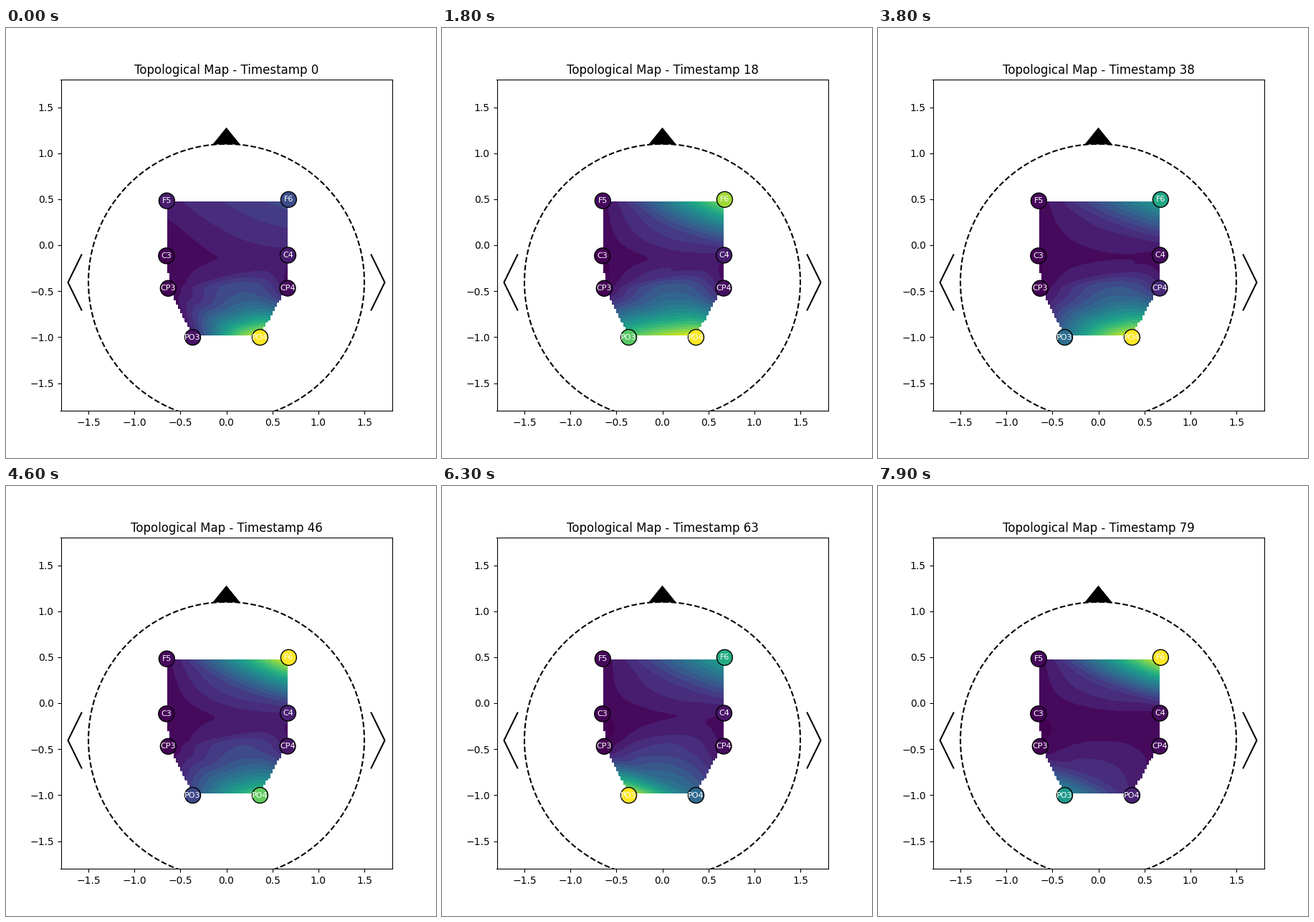
A matplotlib script for the animation above (8 s loop, 600x600 px).

```python
import numpy as np
import matplotlib.pyplot as plt
from matplotlib.animation import FuncAnimation
from matplotlib.tri import CubicTriInterpolator, Triangulation

FRAMES = 80
INTERVAL = 100
CYCLE = 26.5  # timestamps between two frontal peaks

SITES = {
    "F5": (-0.648, 0.482), "F6": (0.677, 0.4965),
    "C3": (-0.6525, -0.116), "C4": (0.670, -0.109),
    "CP3": (-0.6325, -0.470), "CP4": (0.666, -0.468),
    "PO3": (-0.366, -1.002), "PO4": (0.366, -1.002),
}
POS = np.array(list(SITES.values()))


def bump(t, centre, width):
    return np.exp(-((t - centre) / width) ** 2)


def activity(t):
    """Electrode values at time t, scaled to 0..1.

    Activity swings between the right frontal and right occipital sites,
    with two slower bursts on the left occipital one.
    """
    swing = np.sin(np.pi * t / CYCLE) ** 2
    onset = bump(t, 0, 10.4)
    fade = 1 / (1 + np.exp((t - 60) / 4))
    level = {
        "F5": 0.03 + 0.06 * bump(t, 0, 4),
        "F6": 1 - 0.45 * swing - 0.76 * onset,
        "C3": 0.01,
        "C4": 0.04 + 0.13 * bump(t, 8, 8) + 0.22 * bump(t, 54, 6),
        "CP3": 0.01,
        "CP4": 0.04 + 0.08 * bump(t, 38, 6),
        "PO3": 0.67 * bump(t, 25, 16) + 1.17 * bump(t, 68, 12.5),
        "PO4": 0.1 + 0.9 * max(onset, swing * fade),
    }
    vals = np.array([level[name] for name in SITES])
    return (vals - vals.min()) / np.ptp(vals)


def gradient_map(tri, pts):
    """Matrix from node values to nodal gradients of least edge curvature."""
    n = len(pts)
    lhs, rhs = np.zeros((2 * n, 2 * n)), np.zeros((2 * n, n))
    for a, b in tri.edges:
        for i, j in ((a, b), (b, a)):
            e = pts[j] - pts[i]
            w = 1 / np.hypot(*e) ** 3
            ri, rj = slice(2 * i, 2 * i + 2), slice(2 * j, 2 * j + 2)
            lhs[ri, ri] += 4 * w * np.outer(e, e)
            lhs[ri, rj] += 2 * w * np.outer(e, e)
            rhs[ri, j] += 6 * w * e
            rhs[ri, i] -= 6 * w * e
    return np.linalg.solve(lhs, rhs)


def basis_fields(pts, gx, gy):
    """Interpolated surface for a unit value at each electrode."""
    tri = Triangulation(*pts.T)
    grads = gradient_map(tri, pts)
    fields = []
    for i, unit in enumerate(np.eye(len(pts))):
        dz = (grads[0::2, i], grads[1::2, i])
        fields.append(CubicTriInterpolator(tri, unit, kind="user", dz=dz)(gx, gy))
    return np.ma.array(fields)


axis = np.linspace(-1.199, 1.199, 100)
GX, GY = np.meshgrid(axis, axis)
BASIS = basis_fields(POS, GX, GY)
MASK = np.ma.getmaskarray(BASIS).any(axis=0)
BASIS = BASIS.filled(0)

fig, ax = plt.subplots(figsize=(6, 6), dpi=100)
ax.set_xlim(-1.8, 1.8)
ax.set_ylim(-1.8, 1.8)
ax.set_aspect("equal")
title = ax.set_title("")

# Head, nose and ears
ax.add_patch(plt.Circle((0, -0.4), 1.5, fill=False, ls="--", lw=1.5))
ax.fill([-0.15, 0, 0.15], [1.095, 1.28, 1.095], "k", zorder=2)
for side in (-1, 1):
    ax.plot([side * 1.575, side * 1.722, side * 1.575], [-0.105, -0.405, -0.705],
            "k", lw=1.5)

dots = ax.scatter(*POS.T, c=np.zeros(len(POS)), s=250, cmap="viridis",
                  vmin=0, vmax=1, edgecolors="black", linewidths=1, zorder=3)
for name, (x, y) in SITES.items():
    ax.text(x, y, name, color="white", fontsize=8, ha="center", va="center",
            zorder=4)

surface = []


def update(t):
    while surface:
        surface.pop().remove()
    vals = activity(t)
    field = np.ma.array(np.tensordot(vals, BASIS, axes=1), mask=MASK)
    surface.append(ax.contourf(GX, GY, field, levels=20, cmap="viridis",
                               vmin=0, vmax=1, corner_mask=False))
    dots.set_array(vals)
    title.set_text(f"Topological Map - Timestamp {t}")
    return [dots, title]


anim = FuncAnimation(fig, update, frames=FRAMES, interval=INTERVAL,
                     init_func=lambda: [], repeat=True, repeat_delay=0)
plt.show()
```
